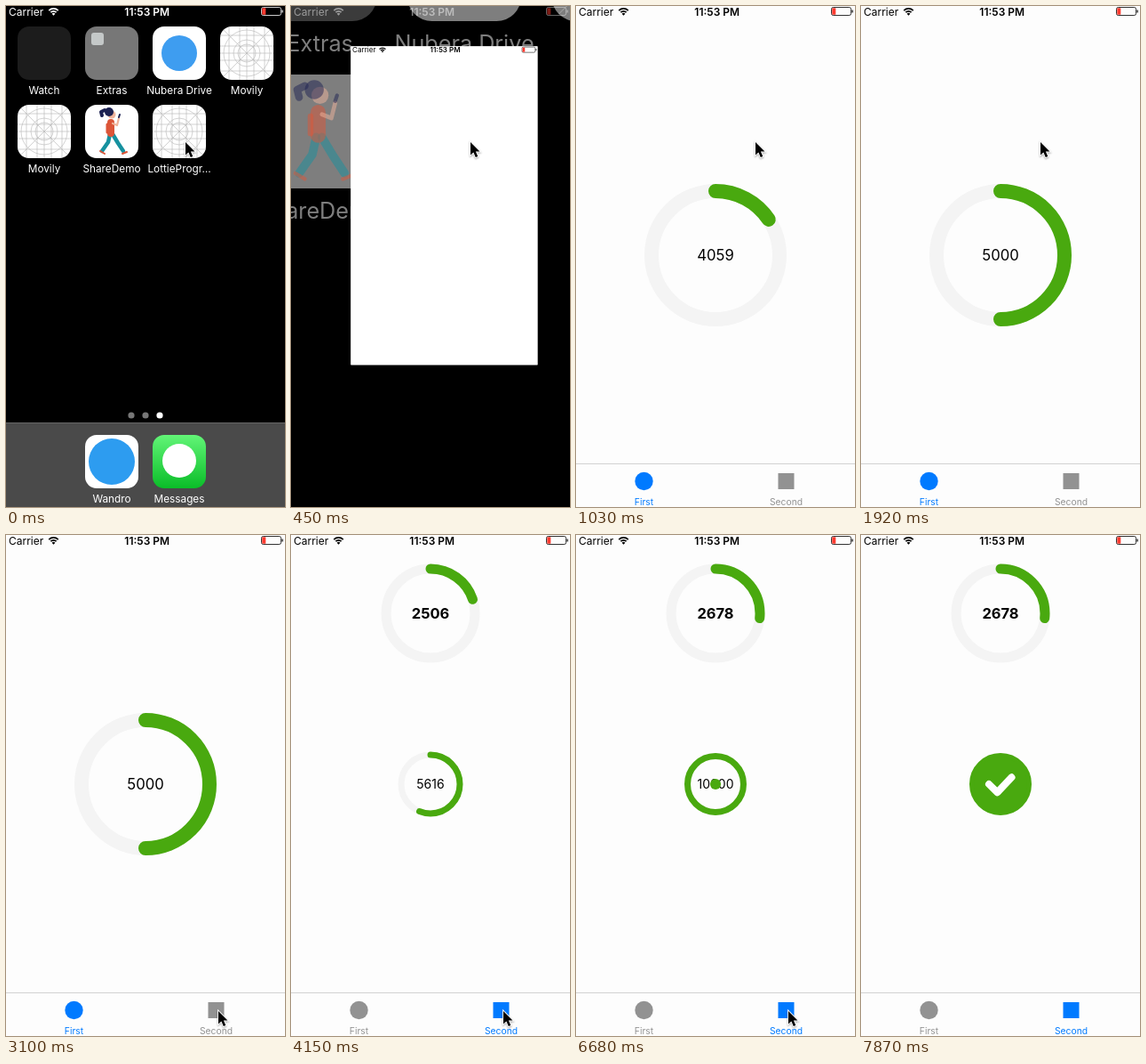
Write an HTML page with a canvas that moves like this. It is 314 px wide and 563 px high and loops after 8790 ms.

```html
<!DOCTYPE html>
<html lang="en">
<head>
<meta charset="utf-8">
<title>Progress rings</title>
<style>
html, body { margin: 0; width: 100%; height: 100%; overflow: hidden; background: #000; }
canvas { display: block; }
</style>
</head>
<body>
<canvas id="stage" width="314" height="563"></canvas>
<script>
const W = 314, H = 563, LOOP = 8790, STEP = 148.5;
const GREEN = '#49a90f', BLUE = '#007aff', GREY = '#929292', PAGE = '#fdfdfd';
const c = document.getElementById('stage').getContext('2d');

const clamp = (v, lo = 0, hi = 1) => Math.min(hi, Math.max(lo, v));
const smooth = u => { u = clamp(u); return u * u * (3 - 2 * u); };
const easeOut = (u, power) => 1 - Math.pow(1 - clamp(u), power);

function rect(x, y, w, h, fill) {
  c.fillStyle = fill;
  c.fillRect(x, y, w, h);
}
function disc(x, y, r, fill) {
  c.fillStyle = fill;
  c.beginPath();
  c.arc(x, y, r, 0, 7);
  c.fill();
}
function line(points, color, width) {
  c.strokeStyle = color;
  c.lineWidth = width;
  c.lineCap = c.lineJoin = 'round';
  c.beginPath();
  points.forEach(p => c.lineTo(...p));
  c.stroke();
}
function text(str, x, y, size, color, weight = 400, align = 'center') {
  c.font = `${weight} ${size}px Inter, sans-serif`;
  c.textAlign = align;
  c.fillStyle = color;
  c.fillText(str, x, y);
}
function group(draw) {
  c.save();
  draw();
  c.restore();
}

// ---- Home screen ----
function tile(x, y, fill, label, draw) {
  group(() => {
    c.translate(x, y);
    c.fillStyle = fill;
    c.beginPath();
    c.roundRect(0, 0, 60, 60, 13);
    c.fill();
    group(() => {
      c.clip();
      if (draw) draw();
    });
    text(label, 30, 76, 11.8, '#fff');
  });
}

function blueprint() {
  c.strokeStyle = '#b4b4b4';
  c.lineWidth = 0.6;
  c.beginPath();
  for (const p of [10, 22, 30, 38, 50]) {
    c.moveTo(p, 0); c.lineTo(p, 60);
    c.moveTo(0, p); c.lineTo(60, p);
  }
  c.moveTo(0, 0); c.lineTo(60, 60);
  c.moveTo(60, 0); c.lineTo(0, 60);
  for (const r of [10, 15, 26]) {
    c.moveTo(30 + r, 30);
    c.arc(30, 30, r, 0, 7);
  }
  c.stroke();
}

function walker() {
  const hair = '#1d2252', skin = '#f0b49c', red = '#dc5538', teal = '#16919f';
  line([[28, 33], [26, 42], [19, 52]], teal, 4.5);
  line([[31, 33], [37, 43], [43, 52]], teal, 4.5);
  line([[17, 52], [22, 55]], red, 2);
  line([[42, 55], [47, 53]], red, 2);
  line([[29, 20], [29, 32]], red, 8);
  line([[31, 21], [36, 23], [38, 15]], skin, 2.2);
  line([[38, 14], [39, 11]], hair, 2);
  line([[25, 22], [25, 31]], red, 3);
  disc(30, 11, 4.5, skin);
  disc(27, 8, 5, hair);
  line([[22, 6], [18, 8], [19, 12]], hair, 4);
}

function icons() {
  tile(13, 23, '#1c1c1c', 'Watch');
  tile(89, 23, '#777', 'Extras', () => {
    c.fillStyle = '#c4c8c8';
    c.beginPath();
    c.roundRect(7, 7, 14, 14, 3);
    c.fill();
  });
  tile(165, 23, '#fff', 'Nubera Drive', () => disc(30, 30, 20, '#3e9df0'));
  tile(241, 23, '#fff', 'Movily', blueprint);
  tile(13, 111, '#fff', 'Movily', blueprint);
  tile(89, 111, '#fff', 'ShareDemo', walker);
  tile(165, 111, '#fff', 'LottieProgr…', blueprint);

  [141, 157, 173].forEach((x, i) => disc(x, 460, 3.6, i < 2 ? '#777' : '#fff'));
  rect(0, 468, W, 95, '#4a4a4a');
  rect(0, 468, W, 1, '#666');
  tile(89, 482, '#fff', 'Wandro', () => disc(30, 30, 26, '#2d9cf0'));
  const green = c.createLinearGradient(0, 0, 0, 60);
  green.addColorStop(0, '#62f577');
  green.addColorStop(1, '#0abd28');
  tile(165, 482, green, 'Messages', () => disc(30, 29, 19, '#fff'));
}

function statusBar(color) {
  text('Carrier', 3, 10.5, 12, color, 400, 'left');
  text('11:53 PM', 158.7, 10.5, 12, color, 600);
  c.strokeStyle = color;
  c.lineWidth = 1.8;
  c.lineCap = 'butt';
  for (const r of [4.4, 7.4]) {
    c.beginPath();
    c.arc(53.5, 10.3, r, -Math.PI * 0.75, -Math.PI * 0.25);
    c.stroke();
  }
  c.fillStyle = color;
  c.beginPath();
  c.moveTo(53.5, 10.8);
  c.arc(53.5, 10.5, 2.6, -Math.PI * 0.75, -Math.PI * 0.25);
  c.fill();
  c.lineWidth = 0.8;
  c.beginPath();
  c.roundRect(287.5, 1.5, 22, 9, 2);
  c.stroke();
  rect(310.5, 4.5, 1.2, 3, color);
  rect(288.3, 2.3, 4, 7.4, '#ff3b30');
}

function home(p) {
  const zoom = 1 + 1.915 * p;
  rect(0, 0, W, H, '#000');
  c.globalAlpha = 1 - 0.85 * p;
  group(() => {
    c.translate(195, 141);
    c.scale(zoom, zoom);
    c.translate(-195, -141);
    icons();
  });
  statusBar('#fff');
  c.globalAlpha = 1;
}

// The app window grows out of its icon.
function launch(p) {
  const x = 165 * (1 - p), y = 111 * (1 - p);
  const w = 60 + 254 * p, h = 60 + 503 * p;
  group(() => {
    c.globalAlpha = clamp(p * 3);
    c.beginPath();
    c.roundRect(x, y, w, h, 13 * Math.pow(1 - p, 3));
    c.clip();
    rect(x, y, w, h, '#fff');
    c.translate(x, y);
    c.scale(w / W, w / W);
    statusBar('#000');
  });
}

// ---- App ----
function ring(x, y, r, width, part) {
  c.lineWidth = width;
  c.lineCap = 'round';
  c.strokeStyle = '#f4f4f4';
  c.beginPath();
  c.arc(x, y, r, 0, 7);
  c.stroke();
  if (part <= 0) return;
  c.strokeStyle = GREEN;
  c.beginPath();
  c.arc(x, y, r, -Math.PI / 2, -Math.PI / 2 + part * 2 * Math.PI);
  c.stroke();
}

const ARC = 1.457, COUNT = 2.9452;
const since = (s, start) => clamp((s - start) / 1147);

function firstTab(s) {
  const u = since(s, 773);
  ring(157, 280, 72, 16, 0.5 * easeOut(u, ARC));
  text(Math.floor(5000 * easeOut(u, 6.513)), 157, 286.3, 16.7, '#000');
}

function secondTab(s) {
  const u = since(s, 3455);
  ring(157, 88, 50, 11, 0.2678 * easeOut(u, ARC));
  text(Math.floor(2678 * easeOut(u, COUNT)), 157, 94.2, 16.5, '#000', 700);

  const again = s > 5456, v = since(s, again ? 5456 : 3455);
  const part = (again ? 1 : 0.6) * easeOut(v, COUNT);
  const shown = again && v < 0.05 ? 0 : part;
  const r = shown > 0 && part < 1 ? 33 : 31.5;
  ring(157, 280, r, 7, shown);
  text(Math.floor(10000 * part), 157, 285.2, 14, '#000');
  if (part === 1) success(s);
}

function success(s) {
  const fill = smooth((s - 6560) / 400), drawn = smooth((s - 6900) / 480);
  disc(157, 280, 30 * fill, GREEN);
  if (drawn > 0) group(() => {
    c.setLineDash([37 * drawn, 100]);
    line([[144, 280], [153.5, 289.3], [169.5, 272.3]], '#fff', 8);
  });
}

function app(s) {
  const second = s > 3390;
  const tint = on => on ? BLUE : GREY;
  rect(0, 0, W, H, PAGE);
  statusBar('#000');
  (second ? secondTab : firstTab)(s);
  rect(0, 514, W, 1, '#d2d2d2');
  disc(76.5, 534, 10.2, tint(!second));
  rect(227.5, 525, 18, 18, tint(second));
  text('First', 76.5, 560.7, 10.3, tint(!second));
  text('Second', 236.5, 560.7, 10.3, tint(second));
}

const arrow = new Path2D('M0 0V14.5L3.4 11.4L5.8 17L8.3 16L5.9 10.6H10.5Z');
const trail = [[202, 153], [273, 297], [277, 515], [271, 534], [255, 527], [239, 535]];

function pointer(n) {
  if (n > 50) return;
  group(() => {
    c.globalAlpha = n === 50 ? 0.5 : 1;
    c.translate(...trail[clamp(n - 14, 0, 5)]);
    c.shadowColor = 'rgba(0,0,0,.35)';
    c.shadowBlur = 2;
    c.shadowOffsetY = 1;
    c.strokeStyle = '#fff';
    c.lineWidth = 1.8;
    c.stroke(arrow);
    c.shadowColor = 'transparent';
    c.fillStyle = '#000';
    c.fill(arrow);
  });
}

// The picture refreshes about seven times a second.
function frame(now) {
  const n = Math.floor((now % LOOP - 278) / STEP);
  const s = 290 + n * STEP;
  const p = smooth((s - 205) / 415);
  if (s > 700) app(s);
  else {
    home(p);
    if (p > 0) launch(p);
  }
  pointer(n);
  requestAnimationFrame(frame);
}
requestAnimationFrame(frame);
</script>
</body>
</html>
```
